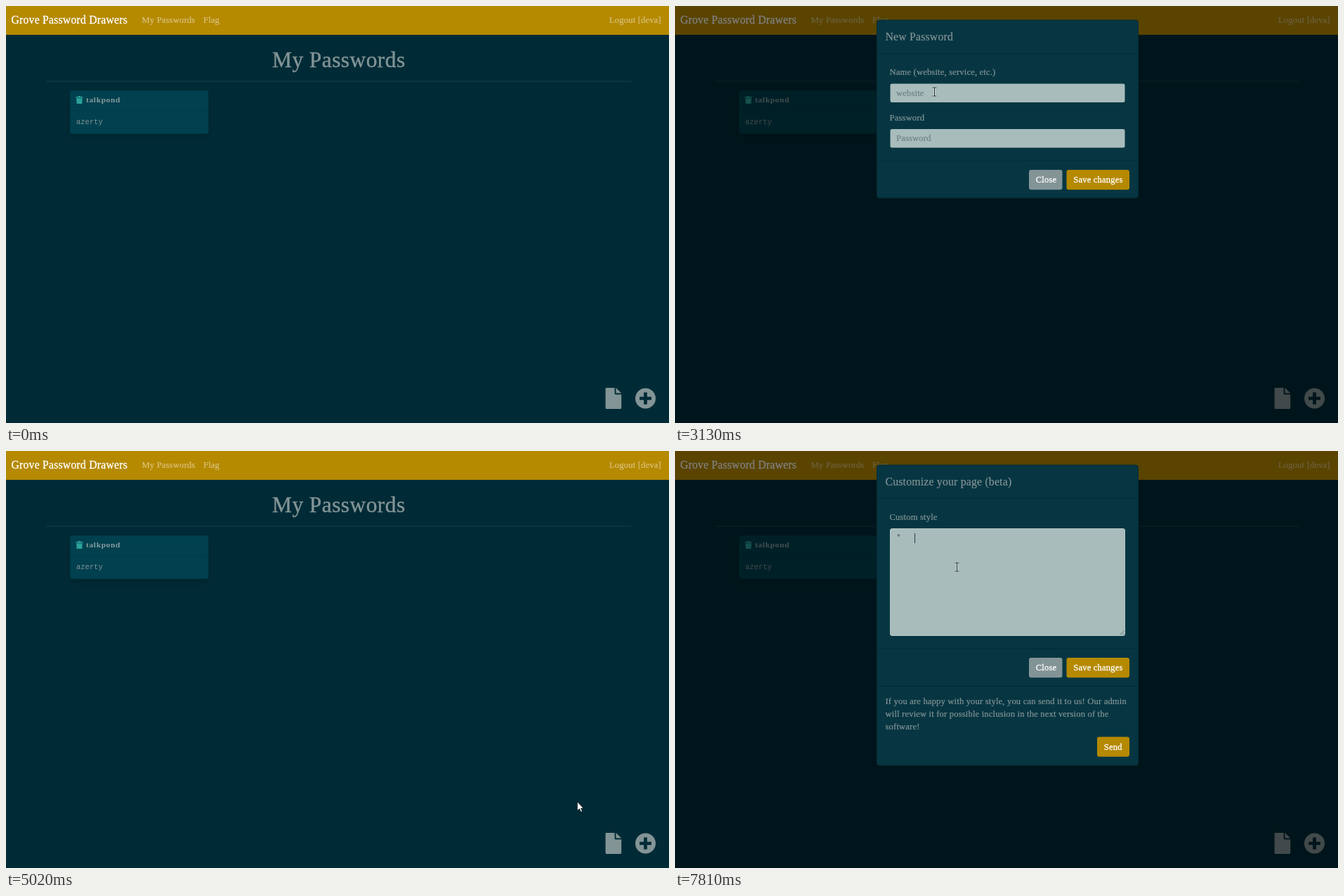
Write an HTML page that moves like this. It is 944 px wide and 593 px high and loops after 8 s.

```html
<!DOCTYPE html>
<html lang="en">
<head>
<meta charset="utf-8">
<title>My Passwords</title>
<style>
  html, body { margin: 0; width: 100%; height: 100%; overflow: hidden; background: #002b36; }
  svg { display: block; width: 944px; height: 593px; }
  text {
    font-family: "Liberation Serif", "Times New Roman", serif;
    font-size: 12.6px; letter-spacing: .013em;
    fill: #839496; stroke: #839496; stroke-width: .2px; white-space: pre;
  }
  .brand, .title { font-size: 15.75px; }
  .brand, .btn { fill: #fff; stroke: #fff; stroke-width: .3px; }
  .link { fill: #dac480; stroke: #dac480; }
  .h1 { font-size: 31.5px; stroke-width: .4px; }
  .name { font-size: 11.3px; font-weight: bold; letter-spacing: .062em; stroke: none; fill: #8a9d9f; }
  .mono { font-family: "Liberation Mono", "Courier New", monospace; font-size: 10.5px; letter-spacing: 0; stroke: none; }
  .hint { fill: #6c8084; stroke: #6c8084; }
  .typed { fill: #3c4f55; }
  .icon { fill: #839496; }
  .field { fill: #a8bcbb; }
  .gold { fill: #b58900; }
  .rule { fill: #042a34; }
</style>
</head>
<body>
<svg viewBox="0 0 944 593" xmlns="http://www.w3.org/2000/svg">
  <defs>
    <filter id="shadow" x="-20%" y="-40%" width="140%" height="200%">
      <feDropShadow dx="0" dy="6" stdDeviation="6" flood-color="#000" flood-opacity=".15"/>
    </filter>
  </defs>

  <rect width="944" height="593" fill="#002b36"/>
  <rect class="gold" width="944" height="41"/>
  <text class="brand" x="7.5" y="25">Grove Password Drawers</text>
  <text class="link" x="193.5" y="24">My Passwords</text>
  <text class="link" x="281" y="24">Flag</text>
  <text class="link" x="859" y="24">Logout [deva]</text>
  <text class="h1" x="379" y="87">My Passwords</text>
  <rect x="57" y="106.5" width="833" height="1" fill="#17424b"/>

  <rect x="91.5" y="120.5" width="196.5" height="61" rx="3" fill="#004150" stroke="#003b49" filter="url(#shadow)"/>
  <rect x="91" y="148" width="197" height="1" fill="#003947"/>
  <path d="M99.5 129h3l.6-1h2.8l.6 1h3v1.5h-10zM100.2 131.2h8.6l-.5 7.8h-7.6z" fill="#2aa198"/>
  <text class="name" x="114" y="137">talkpond</text>
  <text class="mono" x="100" y="168">azerty</text>

  <path class="icon" d="M855 543h11.6v8q0 1.4 1.4 1.4h8.2v19.2q0 1.4-1.4 1.4h-19.8q-1.4 0-1.4-1.4v-27.2q0-1.4 1.4-1.4zM868.5 543l7.7 7.6h-7.7z"/>
  <circle class="icon" cx="910.5" cy="558" r="14.5"/>
  <path d="M910.5 549.6v16.8M902.1 558h16.8" stroke="#002b36" stroke-width="4.7"/>

  <rect id="shade" width="944" height="593" opacity="0"/>
  <g id="newBox" opacity="0"></g>
  <g id="styleBox" opacity="0"></g>

  <path id="arrow" d="M0 0V12.5L2.9 9.8 5 14.4 7 13.5 5 9.1H8.6Z" fill="#fff" stroke="#000" stroke-width=".6"/>
  <g id="beam" fill="none">
    <path d="M-3-6H3M0-6V6M-3 6H3" stroke="#d5dfde" stroke-width="2.6"/>
    <path d="M-3-6H3M0-6V6M-3 6H3" stroke="#1d2b2f"/>
  </g>
</svg>

<script>
const LOOP = 8000, FRAME = 78.3, LEAD = 10;
const $ = id => document.getElementById(id);

const rect = (cls, x, y, w, h, rx = 0, more = "") =>
  `<rect class="${cls}" x="${x}" y="${y}" width="${w}" height="${h}" rx="${rx}" ${more}/>`;
const label = (cls, x, y, str) => `<text class="${cls}" x="${x}" y="${y}">${str}</text>`;
const rule = y => rect("rule", 288, y, 371, 1);
const field = (y, h, id = "") => rect("field", 306.5, y, 334, h, 2.5, id && `id="${id}"`);
const button = (cls, x, y, w, str, id = "") =>
  rect(cls, x, y, w, 28.3, 3, id && `id="${id}"`) + label("btn", x + 9.8, y + 18, str);
const panel = (h, title) =>
  rect("", 287.5, 20, 372, h, 3.6, 'fill="#073642" stroke="#052c36"') +
  label("title", 299.5, 49, title) + rule(67);

$("newBox").innerHTML = panel(253, "New Password") +
  label("", 305.5, 98, "Name (website, service, etc.)") +
  field(110.5, 26.5) + label("hint", 315, 127.5, "website") +
  label("", 305.5, 162.5, "Password") +
  field(175, 26.5) + label("hint", 315, 191.7, "Password") +
  rule(220) + button("icon", 504, 233, 47.5, "Close") +
  button("gold", 557.5, 233, 89.5, "Save changes", "save");

const note = [
  "If you are happy with your style, you can send it to us! Our admin",
  "will review it for possible inclusion in the next version of the",
  "software!"
];
$("styleBox").innerHTML = panel(427, "Customize your page (beta)") +
  label("", 305.5, 98, "Custom style") +
  field(110.5, 152, "area") +
  '<path d="M633.5 261.5l6-6M637 261.5l2.5-2.5" stroke="#5c6d6f" stroke-width=".8"/>' +
  '<text id="typed" class="mono typed" x="315.3" y="126">*</text>' +
  rect("", 315, 117, 1, 14, 0, 'id="caret" fill="#2c3c41"') +
  rule(281) + button("icon", 504, 294, 47.5, "Close") +
  button("gold", 557.5, 294, 89.5, "Save changes") + rule(334) +
  note.map((line, i) => label("", 299.5, 359.5 + 18 * i, line)).join("") +
  button("gold", 601, 406.5, 46, "Send");

const spot = {
  start: [367, 261], card: [184, 148], file: [865, 546], plus: [905, 556],
  nameField: [369, 122], title: [301, 33], save: [590, 245],
  outside: [616, 318], turn: [774, 512], area: [401, 165]
};
const moves = [
  { to: "card", from: 290, till: 640 },
  { to: "file", from: 640, till: 1410 },
  { to: "plus", from: 1730, till: 1900 },
  { to: "nameField", from: 2230, till: 3080 },
  { to: "title", from: 3150, till: 3610 },
  { to: "save", from: 3730, till: 4420 },
  { to: "outside", from: 4420, till: 4630 },
  { to: "file", from: 4780, till: 5370 },
  { to: "turn", from: 5430, till: 5569 },
  { to: "area", from: 5569, till: 6440 }
];

const ramp = (t, from, len) => Math.min(1, Math.max(0, (t - from) / len));
const easeOut = (x, power = 1.7) => 1 - (1 - x) ** power;

function pointerAt(t) {
  return moves.reduce((pos, m) => {
    const k = easeOut(ramp(t, m.from, m.till - m.from), 3);
    return pos.map((v, i) => v + (spot[m.to][i] - v) * k);
  }, spot.start);
}

function place(id, alpha, x, y) {
  $(id).setAttribute("opacity", alpha);
  $(id).setAttribute("transform", `translate(${x} ${y})`);
}

function showBox(id, t, start, end) {
  const alpha = ramp(t, start + 37, 150) - ramp(t, end, 130);
  const drop = easeOut(ramp(t, start, 300)) - easeOut(ramp(t, end, 300));
  place(id, alpha, 0, -50 * (1 - drop));
}

function drawTyping(time) {
  const focusAt = 6190, typeAt = 6920, keyGap = 140, blink = 480;
  const keys = Math.min(4, Math.max(0, Math.floor((time - typeAt) / keyGap) + 1));
  const since = time - (keys ? typeAt + (keys - 1) * keyGap : focusAt);
  $("area").style.stroke = `rgba(181,200,198,${ramp(time, focusAt - 40, 130)})`;
  $("typed").setAttribute("opacity", keys ? 1 : 0);
  $("caret").setAttribute("x", Math.round(315 + 6.5 * keys));
  $("caret").setAttribute("opacity", since >= 0 && since % (2 * blink) < blink ? 1 : 0);
}

function draw(time) {
  // the picture advances in even steps, like a screen recording
  const t = Math.floor((time + LEAD) / FRAME) * FRAME + LEAD;
  const shade = ramp(t, 1965, 135) - ramp(t, 4900, 115) + ramp(t, 5410, 135);
  $("shade").setAttribute("opacity", .5 * shade);
  showBox("newBox", t, 2049, 4770);
  showBox("styleBox", t, 5494, Infinity);

  const [x, y] = pointerAt(t);
  const inside = (left, right, top, bottom) => x > left && x < right && y > top && y < bottom;
  const newOpen = t > 2250 && t < 4770;
  const overText = newOpen && (inside(306, 641, 110, 137) || inside(306, 641, 174, 202)) ||
    t > 5700 && inside(306, 641, 110, 263);
  const seen = time >= 90;
  place("arrow", seen && !overText ? 1 : 0, x, y);
  place("beam", seen && overText ? 1 : 0, Math.round(x) + .5, Math.round(y));
  $("save").style.fill = newOpen && inside(557, 647, 233, 261) ? "#8f6c00" : "";

  drawTyping(time);
}

const begin = performance.now();
function tick() {
  draw((performance.now() - begin) % LOOP);
  requestAnimationFrame(tick);
}
tick();
</script>
</body>
</html>
```
